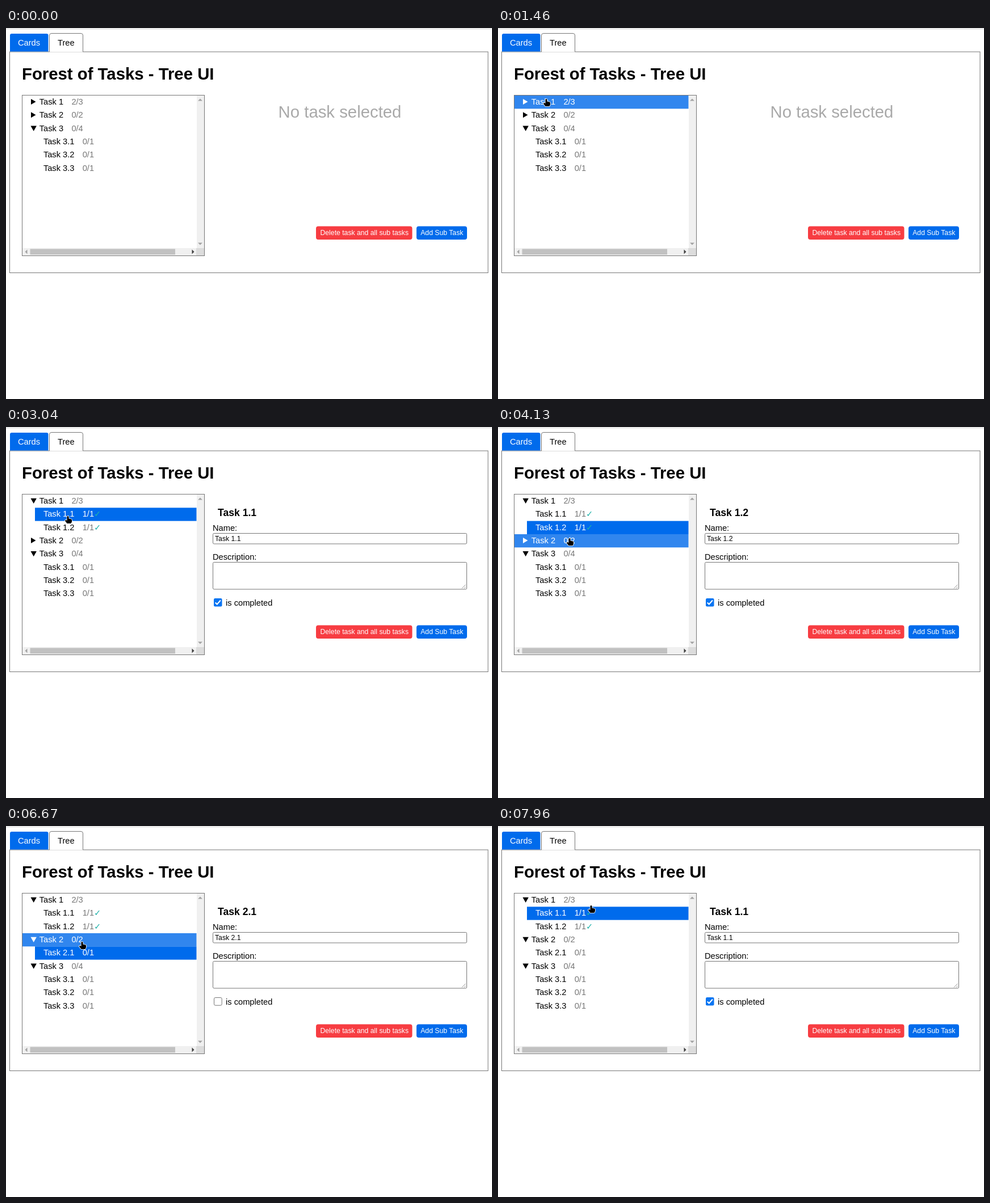
An HTML page that plays this animation: 856x654 px, repeating every 8 s.

```html
<!DOCTYPE html>
<html lang="en">
<head>
<meta charset="utf-8">
<title>Forest of Tasks</title>
<style>
html, body { margin: 0; width: 100%; height: 100%; overflow: hidden; background: #fff; }
svg { display: block; font: 14.67px "Liberation Sans", Arial, sans-serif; }
.h1 { font-size: 29.33px; }
.h3 { font-size: 17.6px; font-weight: bold; }
.small { font-size: 12.22px; }
.tick { font: bold 14.67px "DejaVu Sans", sans-serif; fill: #20b2aa; }
.line { fill: #fff; stroke: #767676; }
.pointer { stroke: #fff; stroke-width: 1.6; paint-order: stroke; }
</style>
</head>
<body>
<svg width="856" height="654" viewBox="0 0 856 654">
  <rect y="1" width="856" height="1" fill="#d0d0d0"/>
  <rect class="line" x="6.5" y="42" width="842.5" height="389.5"/>
  <path d="M7 41.5V13q0-3 3-3H71.500q3 0 3 3V41.500Z" fill="#006bec"/>
  <path d="M76.500 42.600V13q0-3.500 3.500-3.500H132q3.500 0 3.500 3.500V42.600" fill="#fff"/>
  <path d="M76.500 42V13q0-3.500 3.500-3.500H132q3.500 0 3.500 3.500V42" fill="none" stroke="#767676"/>
  <text x="21" y="31" fill="#fff">Cards</text>
  <text x="91" y="31">Tree</text>
  <text class="h1" x="28" y="91" font-weight="bold">Forest of Tasks - Tree UI</text>

  <rect class="line" x="28.500" y="118.500" width="321" height="283"/>
  <path d="M336 119H349V388H336ZM29 388H335V401H29Z" fill="#f0f0f0"/>
  <path d="M335 388H349V401H335Z" fill="#dcdcdc"/>
  <path d="M42.500 389.500H298V399.500H42.500Z" fill="#c1c1c1"/>
  <path d="M338 128.500h8l-4-4ZM338 378.500h8l-4 4ZM37.500 390.500v8l-4-4Z" fill="#a3a3a3"/>
  <path d="M327.500 390.500v8l4-4Z" fill="#404040"/>

  <rect x="546" y="349.500" width="169.500" height="23.500" rx="4" fill="#f73d42"/>
  <rect x="723" y="349.500" width="89" height="23.500" rx="4" fill="#006bec"/>
  <g class="small" fill="#fff">
    <text x="553.500" y="364.500">Delete task and all sub tasks</text>
    <text x="730.200" y="364.500">Add Sub Task</text>
  </g>
  <g id="scene"></g>
</svg>
<script>
const FPS = 24, LOOP = 8000, TOP = 119, PITCH = 23.33, HOVER_LAG = 0.9;
const BLUE = '#006bec', HOVER = '#3186ee';
const scene = document.getElementById('scene');

const tasks = [
  { id: '1', count: '2/3', opens: 53 },
  { id: '1.1', count: '1/1', done: true },
  { id: '1.2', count: '1/1', done: true },
  { id: '2', count: '0/2', opens: 121 },
  { id: '2.1', count: '0/1' },
  { id: '3', count: '0/4', opens: 0 },
  { id: '3.1', count: '0/1' },
  { id: '3.2', count: '0/1' },
  { id: '3.3', count: '0/1' }
];
const byId = id => tasks.find(t => t.id === id);

// [tick, task]
const clicks = [[43, '1'], [73, '1.1'], [91, '1.2'], [108, '2'],
  [145, '2.1'], [170, '2'], [181, '1.2'], [190, '1.1']];

// [start tick, end tick, x, y, ease-out power]
const ENTER = 11;
const moves = [
  [ENTER, 22, 185, 281, 1], [22, 24, 192, 314, 1], [24, 25, 190, 304, 1],
  [28, 35, 85, 125, 2], [43, 46, 84, 127, 2], [61, 65, 109, 157, 2],
  [77, 81, 126, 171, 2], [84, 85, 129, 174, 2], [96, 99, 126, 196, 2],
  [132, 137, 129, 221, 2], [159, 160, 134, 204, 20], [170, 176, 151, 170, 2],
  [181, 184, 156, 153, 2], [189, 191, 164, 140, 2]
];

function mouseAt(tick) {
  let x = 25, y = 0;
  for (const [start, end, toX, toY, power] of moves) {
    if (tick <= start) break;
    const p = Math.min(1, (tick - start) / (end - start));
    const e = 1 - (1 - p) ** power;
    x += (toX - x) * e;
    y += (toY - y) * e;
  }
  return { x, y };
}

const text = (x, y, s, attrs = '') => `<text x="${x}" y="${y}" ${attrs}>${s}</text>`;

function rowAt({ x, y }, rows) {
  const row = rows[Math.floor((y - TOP) / PITCH)];
  return row && x < 336 && x > (row.id.length > 1 ? 51 : 29) ? row : null;
}

function drawRow(task, i, tick, selected, hovered) {
  const sub = task.id.length > 1, y = TOP + i * PITCH, base = y + 16;
  const left = sub ? 51 : 29, active = selected || hovered;
  const ink = active ? '#fff' : '#000';
  let out = '';
  if (active) out += `<rect x="${left}" y="${y}" width="${335.5 - left}" height="${PITCH}" fill="${selected ? BLUE : HOVER}"/>`;
  if (!sub) {
    const shape = tick >= task.opens ? `M43.5 ${y + 6.8}h10.400l-5.200 9.200Z` : `M44 ${y + 6}v10l8.500-5Z`;
    out += `<path d="${shape}" fill="${ink}"/>`;
  }
  out += text(sub ? 65.9 : 58.7, base, 'Task ' + task.id, `fill="${ink}"`);
  out += text(sub ? 134.7 : 115.4, base, task.count, `fill="${active ? '#fff' : '#777'}"`);
  if (task.done) out += text(155, base, '✓', 'class="tick"');
  return out;
}

function drawDetails(task) {
  if (!task) return text(588, 158, 'No task selected', 'class="h1" fill="#a9a9a9" text-anchor="middle"');
  const name = 'Task ' + task.id;
  const box = task.done
    ? '<rect x="366" y="302" width="14.500" height="14.500" rx="2.300" fill="#0a75f2"/><path d="M368.700 309.500l3 3 6.200-7" fill="none" stroke="#fff" stroke-width="2"/>'
    : '<rect class="line" x="366.500" y="302.500" width="13.700" height="13.700" rx="2.300"/>';
  return text(373, 157, name, 'class="h3"')
    + text(364, 183, 'Name:')
    + '<rect class="line" x="364.500" y="187.500" width="447" height="18.500" rx="2"/>'
    + text(368, 201, name, 'class="small"')
    + text(364, 234, 'Description:')
    + '<rect class="line" x="364.500" y="238.500" width="447" height="47.500" rx="2"/>'
    + '<path d="M803 284.500l6.500-6.500M807 284.500l2.500-2.500" stroke="#777" stroke-width=".8"/>'
    + box + text(387, 315, 'is completed');
}

function drawPointer({ x, y }, hand) {
  const shape = hand
    ? 'M-1.500 1Q0-1 1.500 1V4.500L5 5.200Q7 5.500 7 7V10L5.500 13H-1.500L-5 8.500Q-5 6.500-3 7L-1.500 8Z'
    : 'M0 0V12L2.800 9.500 4.800 14 6.800 13 4.800 8.800H8.500Z';
  return `<path class="pointer" transform="translate(${x} ${y})" d="${shape}"/>`;
}

function draw(tick) {
  const click = clicks.filter(c => c[0] <= tick).pop();
  const selected = click && byId(click[1]);
  const rows = tasks.filter(t => t.id.length === 1 || tick >= byId(t.id[0]).opens);
  const mouse = mouseAt(tick);
  const hovered = tick > ENTER && rowAt(mouseAt(tick - HOVER_LAG), rows);
  let out = rows.map((t, i) => drawRow(t, i, tick, t === selected, t === hovered)).join('');
  out += drawDetails(selected);
  if (tick >= ENTER) out += drawPointer(mouse, rowAt(mouse, rows));
  scene.innerHTML = out;
}

const began = performance.now();
let last = -1;
function loop() {
  const ms = (performance.now() - began) % LOOP;
  const tick = Math.floor((ms + 5) * FPS / 1000) % (LOOP * FPS / 1000);
  if (tick !== last) draw(last = tick);
  requestAnimationFrame(loop);
}
loop();
</script>
</body>
</html>
```
